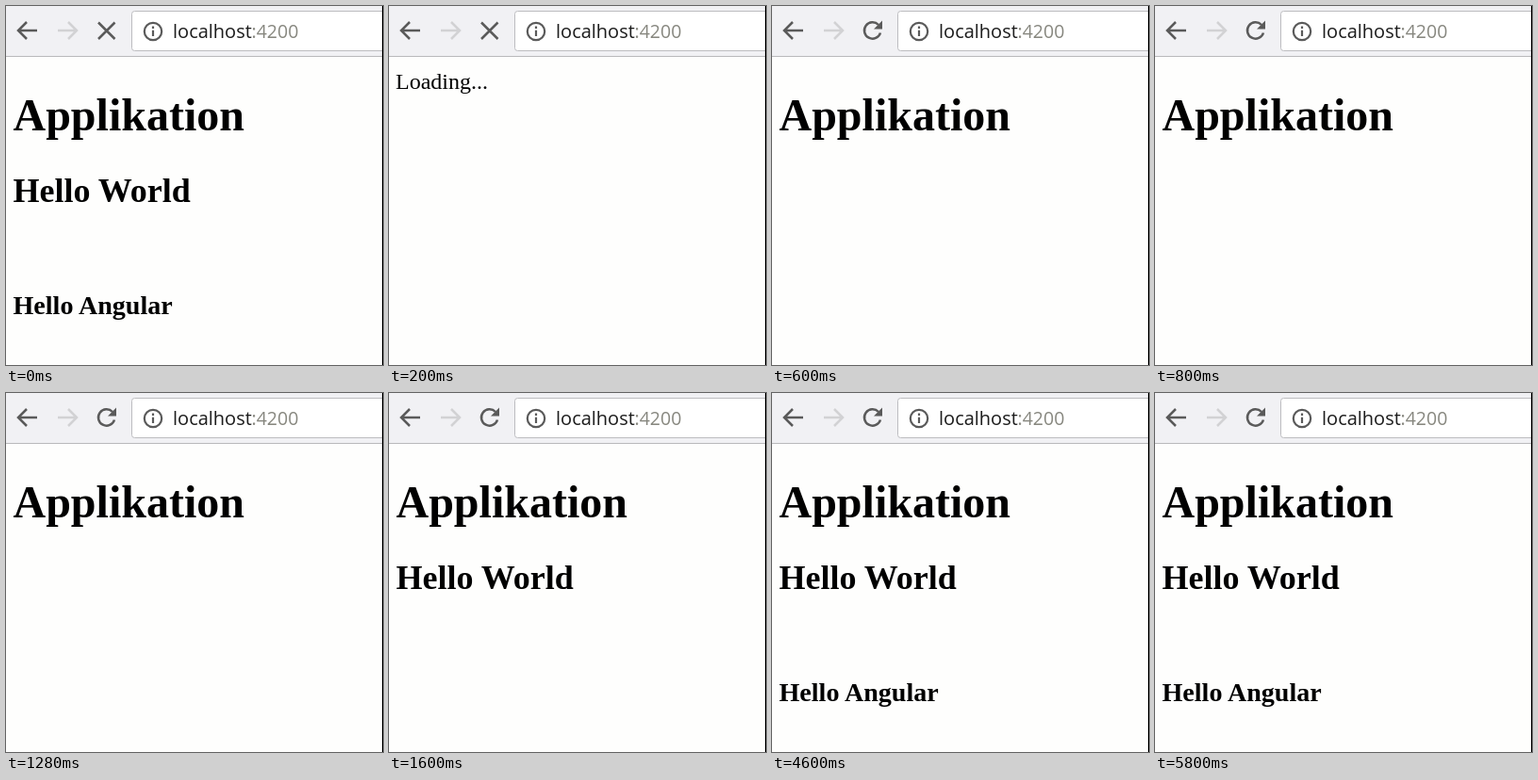
An HTML page that plays this animation: 400x381 px, repeating every 6.6 s.

```html
<!DOCTYPE html>
<html lang="de">
<head>
<meta charset="utf-8">
<title>Page reload</title>
<style>
  html, body { margin: 0; width: 100%; height: 100%; overflow: hidden; background: #fefefd; }
  svg { display: block; width: 400px; height: 381px; }
  .page { font-family: "Liberation Serif", "Times New Roman", serif; fill: #000; }
  .page .heading { font-weight: bold; }
  .address { font-family: "Open Sans", "Noto Sans", sans-serif; }
  .icon { fill: none; stroke: #5a5a5a; stroke-width: 2.5; }
</style>
</head>
<body>
<svg viewBox="0 0 400 381">
  <rect width="400" height="381" fill="#fefefd"/>

  <!-- Browser toolbar -->
  <rect width="400" height="53" fill="#f1f1f4"/>
  <rect y="53" width="400" height="1" fill="#b9b9bb"/>
  <rect x="133.5" y="5.5" width="280" height="42" rx="3" fill="#fff" stroke="#bdbdc0"/>
  <path class="icon" d="M33 26H13.5M22 17L13 26L22 35"/>
  <path class="icon" style="stroke:#d2d2d4" d="M55 26H74.5M66 17L75 26L66 35"/>
  <path class="icon" id="stop" d="M98 17.5L115.500 35M115.500 17.5L98 35"/>
  <g id="reload">
    <path class="icon" d="M113 20A8.700 8.700 0 1 0 115 28.500"/>
    <path fill="#5a5a5a" d="M117 15.500V24.500H108Z"/>
  </g>
  <circle class="icon" style="stroke-width:2.2" cx="156" cy="27" r="9.200"/>
  <path class="icon" style="stroke-width:2.2" d="M156 21.500V24M156 25.700V32"/>
  <g class="address">
    <text x="177" y="34" font-size="20" fill="#1c1c1c">localhost</text>
    <text x="260.500" y="34" font-size="19.500" fill="#87877f">:4200</text>
  </g>

  <!-- Page content -->
  <g class="page">
    <text id="loading" x="7" y="88" font-size="24">Loading...</text>
    <text id="title" class="heading" x="7.500" y="132" font-size="48">Applikation</text>
    <text id="world" class="heading" x="7.500" y="208" font-size="36">Hello World</text>
    <text id="angular" class="heading" x="7.500" y="327" font-size="28.080">Hello Angular</text>
  </g>
  <rect x="399" width="1" height="381" fill="#000"/>
</svg>
<script>
  const LOOP = 6600;

  // Each part: visible at the start of the loop, then toggled at these times (ms).
  const parts = {
    stop:    { visible: 1, toggles: [600] },
    reload:  { visible: 0, toggles: [600] },
    loading: { visible: 0, toggles: [200, 600] },
    title:   { visible: 1, toggles: [200, 600] },
    world:   { visible: 1, toggles: [200, 1600] },
    angular: { visible: 1, toggles: [200, 4600] },
  };

  for (const [id, { visible, toggles }] of Object.entries(parts)) {
    const frames = [0, ...toggles, LOOP].map((time, i, all) => {
      const flips = Math.min(i, all.length - 2);
      return { offset: time / LOOP, opacity: (visible + flips) % 2, easing: "step-end" };
    });
    document.getElementById(id).animate(frames, { duration: LOOP, iterations: Infinity });
  }
</script>
</body>
</html>
```
